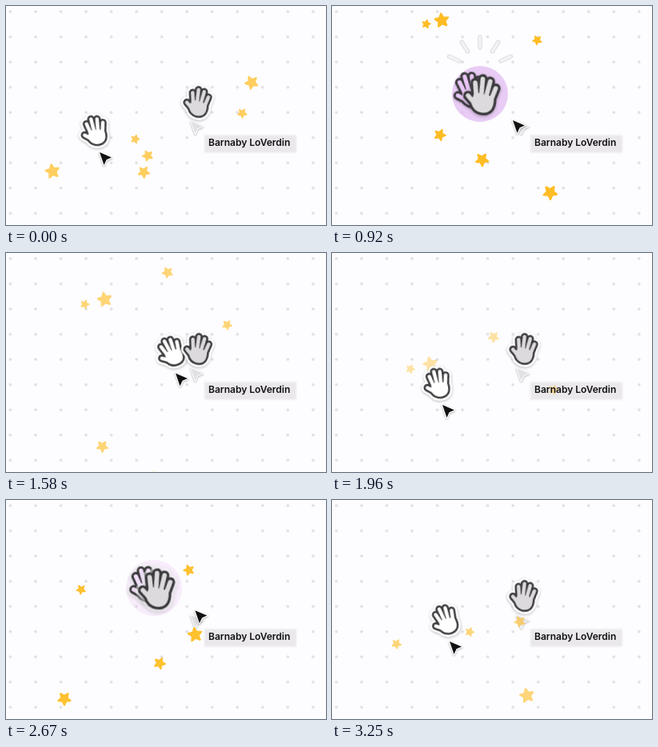
An HTML page for the animation above (3.29 s loop, 400 by 274 pixels).

```html
<!DOCTYPE html>
<html lang="en">
<head>
<meta charset="utf-8">
<title>High five</title>
<style>
  html, body { margin: 0; width: 100%; height: 100%; overflow: hidden; background: #fdfcfe; }
  svg { display: block; width: 100vw; height: 100vh; }
  text { font: 600 12px Inter, "Liberation Sans", sans-serif; fill: #111; }
  .hand { filter: drop-shadow(0 1px 1.5px rgba(0, 0, 0, .28)); }
  .cursor { stroke-linejoin: round; filter: drop-shadow(0 1px 1px rgba(0, 0, 0, .3)); }
</style>
</head>
<body>
<svg viewBox="0 0 400 274">
  <defs>
    <pattern id="dots" x="-10.3" y="-8.7" width="31.53" height="31.53" patternUnits="userSpaceOnUse">
      <circle cx="15.77" cy="15.77" r="1.8" fill="#dddbdf"/>
    </pattern>
    <path id="palm" stroke-linecap="round" stroke-linejoin="round"
      d="M-6 1L-9-10M-1 0L-2.5-15M4 0L5-14M9.5 2L11.5-8.5M-4 11L-13.5 3.5M-6 1L9.5 2Q12 15 2 15Q-4 15-7 9Z"/>
    <path id="arrow" d="M0 0L5.5 16L8.6 9.3L15 6.4Z"/>
    <filter id="soft" x="-10%" y="-30%" width="120%" height="160%"><feGaussianBlur stdDeviation=".9"/></filter>
  </defs>
  <rect width="400" height="274" fill="#fdfcfe"/>
  <rect width="400" height="274" fill="url(#dots)"/>
  <use href="#arrow" class="cursor" x="231" y="144" fill="#e2e0e3" stroke="#fff" stroke-width="2" paint-order="stroke"/>
  <rect x="248" y="161.5" width="115" height="22" fill="#eae8eb" filter="url(#soft)"/>
  <g id="stars"></g>
  <circle id="glow" cx="185" cy="110" fill="#e2b8f3"/>
  <g id="rays"></g>
  <text x="253" y="175.4">Barnaby LoVerdin</text>
  <g id="hands"></g>
  <use id="pointer" href="#arrow" class="cursor" fill="#111" stroke="#fff" stroke-width="2.4" paint-order="stroke"/>
</svg>
<script>
const LOOP = 3.29, GRAVITY = 192, DRAG = 5.5;
const $ = id => document.getElementById(id);
const clamp = v => Math.max(0, Math.min(1, v));
const mix = (a, b, u) => a.map((v, i) => v + (b[i] - v) * u);

// Smooth 0 to 1 while t goes from start to end.
function ramp(t, start, end) {
  const u = clamp((t - start) / (end - start));
  return u * u * (3 - 2 * u);
}

function add(parent, tag, attrs) {
  const node = document.createElementNS("http://www.w3.org/2000/svg", tag);
  for (const name in attrs) node.setAttribute(name, attrs[name]);
  return parent.appendChild(node);
}

function place(node, [x, y, angle = 0, scale = 1]) {
  node.setAttribute("transform", `translate(${x} ${y}) rotate(${angle}) scale(${scale})`);
}

// Where the hands part after each clap; swap = -1 sends them past each other.
const claps = [{ time: .65, partX: 228, swap: 1 }, { time: 2.3, partX: 237, swap: -1 }];
const clapAt = t => claps[t < 1.7 ? 0 : 1];

// The pointer glides to each stop and arrives at the given time.
const pointerStart = [117, 183], GLIDE = .36;
const pointerStops = [
  { time: .54, at: [226, 143] }, { time: 1.85, at: [138, 190] }, { time: 2.34, at: [239, 138] },
  { time: 2.96, at: [213, 140] }, { time: 3.32, at: [140, 181] }
];
const pointerAt = t => pointerStops.reduce(
  (pos, stop) => mix(pos, stop.at, ramp(t, stop.time - GLIDE, stop.time)), pointerStart);

function whiteRest(t) {
  const [x, y] = pointerAt(t), speed = (x - pointerAt(t - .02)[0]) / .02;
  return [x - 6, y - 27, -9 + .05 * speed, 1];
}
const grayRest = () => [240, 120, 12, 1];

// A clap: wind up, slam together, part, go back to rest. side: -1 left, 1 right.
function handPose(hand, t) {
  const { time, partX, swap } = clapAt(t), age = t - time;
  const { side } = hand, out = side * swap;
  const steps = [
    [[199 + 58 * side, 149, 40 * side, .68], ramp(age, -.3, -.07)],
    [[180 + 8 * side, 108 + 3 * side, 11 * side, 1.23 + .06 * side], ramp(age, -.07, .01)],
    [[partX + 19 * out, 117, 46 * out, 1.26], ramp(age, .35, .55)],
    [hand.rest(t), ramp(age, .66, .96)]
  ];
  return steps.reduce((pose, [next, u]) => mix(pose, next, u), hand.rest(t));
}

function makeHand(fill, side, rest) {
  const node = add($("hands"), "g", { class: "hand" });
  const layer = (color, width) =>
    add(node, "use", { href: "#palm", fill: color, stroke: color, "stroke-width": width });
  return { node, side, rest, sticker: layer("#fff", 14.6), line: layer("#3b3a3d", 9.4), skin: layer(fill, 4.4) };
}
const white = makeHand("#fff", -1, whiteRest);
const gray = makeHand("#dcdadd", 1, grayRest);

// Each burst flings stars from one origin towards a few landing offsets.
const origin = [186, 138], sizes = [9, 5.6, 6.8, 7.4, 6, 8.4];
const bursts = [
  { time: -.75, reach: [[-130, 15], [-25, -26], [-9, -5], [-14, 16], [111, -59], [123, -98]] },
  { time: claps[0].time, reach: [[-63, -164], [-88, -158], [16, -198], [-66, 21], [91, -132], [2, 61], [112, 114]] },
  { time: claps[1].time, reach: [[58, 20], [-14, -60], [49, -73], [7, 61], [-106, -45], [-130, 112]] }
];

const starPath = "M" + Array.from({ length: 10 }, (_, i) => {
  const r = i % 2 ? .45 : .95, a = i * Math.PI / 5;
  return `${r * Math.sin(a)} ${-r * Math.cos(a)}`;
}).join("L") + "Z";

const stars = bursts.flatMap(({ time, reach }) => reach.map((offset, i) => ({
  time, offset, size: sizes[i % sizes.length], spin: (i % 2 ? 1 : -1) * (6 + 4 * i),
  node: add($("stars"), "path", {
    d: starPath, fill: "#ffbc1f", stroke: "#ffbc1f", "stroke-width": .26, "stroke-linejoin": "round"
  })
})));

function drawStar({ time, offset, size, spin, node }, t) {
  const age = t - time, spread = 1 - Math.exp(-DRAG * age);
  node.setAttribute("opacity", age < 0 ? 0 : clamp(1.13 - .56 * age));
  place(node, [
    origin[0] + offset[0] * spread,
    origin[1] + offset[1] * spread + GRAVITY * age * age / 2,
    spin * (1 + age), size
  ]);
}

const rays = Array.from({ length: 5 }, () => add($("rays"), "rect", {
  x: -2.2, y: -9, width: 4.4, height: 18, rx: 2.2, fill: "#e9e7ea", stroke: "#b5b2b8", "stroke-width": 1
}));

function drawClap(t) {
  const age = t - clapAt(t).time, on = age >= 0;
  $("glow").setAttribute("r", on ? 35 * clamp(.5 + age * 8) : 0);
  $("glow").setAttribute("opacity", on ? .95 * clamp((.42 - age) / .2) : 0);
  $("rays").setAttribute("opacity", on ? clamp((.34 - age) / .15) : 0);
  rays.forEach((ray, i) => ray.setAttribute("transform",
    `translate(185 81) rotate(${(i - 2) * 32.5}) translate(0 ${-22 - 50 * age})`));

  // While they touch, the hands lose their sticker edge and the rear one takes the glow.
  const touch = ramp(age, -.05, .02) - ramp(age, .3, .45);
  for (const hand of [white, gray]) hand.sticker.setAttribute("opacity", 1 - touch);
  const tint = `color-mix(in srgb, #fff, #e2b8f3 ${80 * touch}%)`;
  white.skin.style.fill = white.skin.style.stroke = tint;
}

function render(t) {
  for (const hand of [white, gray]) place(hand.node, handPose(hand, t));
  place($("pointer"), pointerAt(t));
  stars.forEach(star => drawStar(star, t));
  drawClap(t);
}

const begin = performance.now();
function tick() {
  render((performance.now() - begin) / 1000 % LOOP);
  requestAnimationFrame(tick);
}
tick();
</script>
</body>
</html>
```
